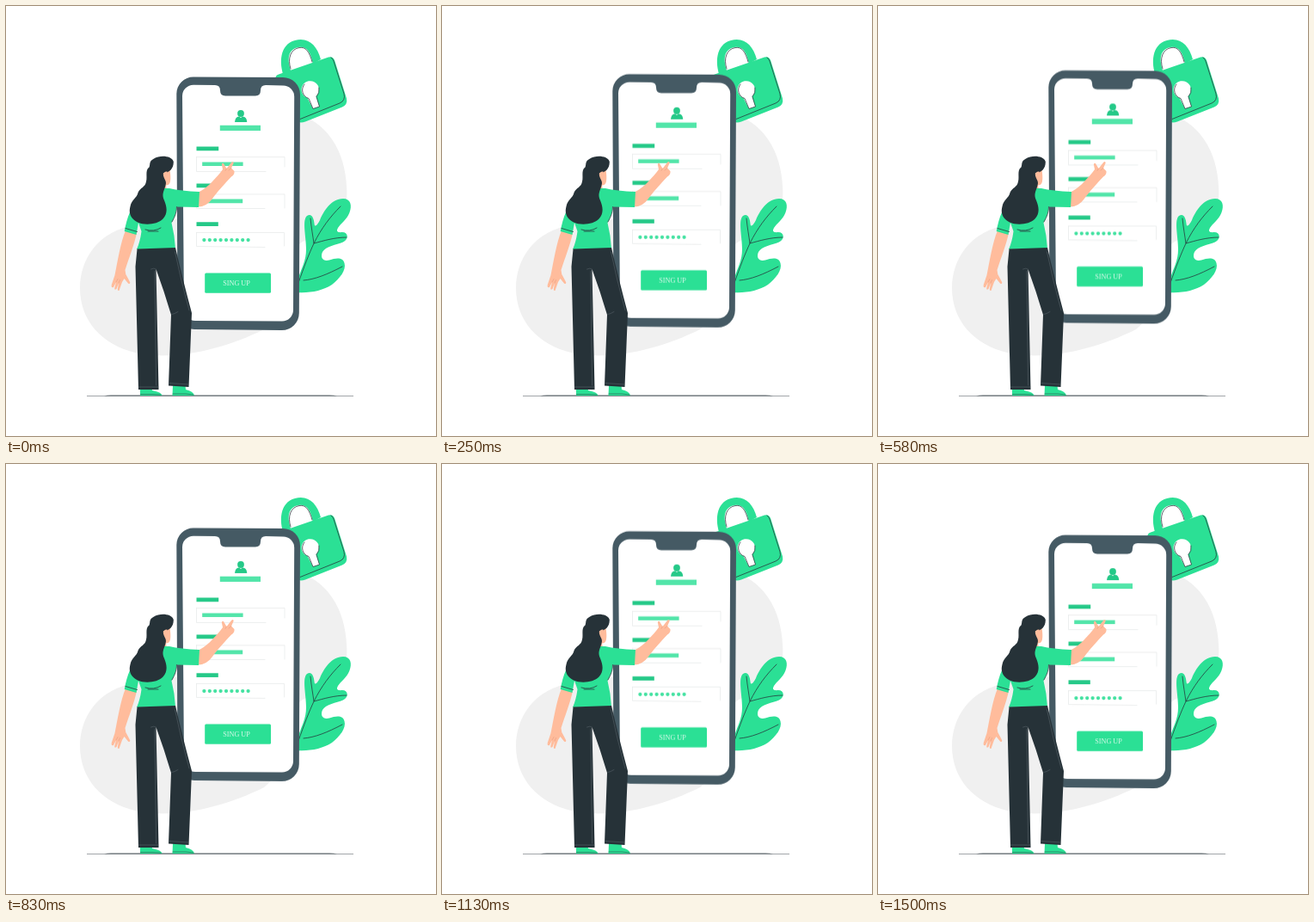
Recreate the animation shown at these times as an HTML page. Size 500 px wide and 500 px high, loop 1540 ms.

```html
<!DOCTYPE html>
<html lang="en">
<head>
<meta charset="utf-8">
<title>Sign up</title>
<style>
  html, body { margin: 0; width: 100%; height: 100%; overflow: hidden; background: #fff; }
  svg { display: block; width: 100vw; height: 100vh; }
  .green { fill: #2be095; }
  .deep { fill: #25c988; }
  .light { fill: #52e5a9; }
  .dark { fill: #263238; }
  .skin { fill: #ffbc9c; }
  .frame { fill: #455a64; }
  .blob { fill: #f0f0f0; }
  .white { fill: #fff; }
  .ink, .seam, .field, .crease { fill: none; stroke-linecap: round; stroke-linejoin: round; }
  .ink { stroke: #263238; stroke-width: .75; }
  .seam { stroke: #667178; stroke-width: .45; }
  .crease { stroke: #e0957b; stroke-width: .5; }
  .field { stroke: #e6e8e8; stroke-width: .7; }
  .dots { fill: none; stroke: #43e2a1; stroke-width: 4.3; stroke-linecap: round; stroke-dasharray: 0 6.4; }
  .label { font: 8.2px "Liberation Serif", "Times New Roman", serif; fill: #dcf9ec; text-anchor: middle; }
  #phone { animation: float 1.54s -8ms infinite; }
  /* linear rise and fall, sampled at 24 fps */
  @keyframes float {
    0% { transform: translateY(0); animation-timing-function: steps(18); }
    48.64% { transform: translateY(-9.8px); animation-timing-function: step-start; }
    48.65% { transform: translateY(-9.2px); animation-timing-function: steps(18); }
    97.29% { transform: translateY(.6px); animation-timing-function: step-start; }
    97.3%, 100% { transform: translateY(.1px); }
  }
</style>
</head>
<body>
<svg viewBox="0 0 500 500">
  <path class="blob" d="M150 255C108 261 86 294 86 328C86 366 112 394 150 403C194 413 252 400 300 376C335 350 318 300 342 276C360 264 385 262 392 240C396 228 397 220 396 210C394 170 376 139 342 126C290 118 280 180 245 220C220 248 190 250 150 255Z"/>

  <g id="lock">
    <path class="green" fill-rule="evenodd" d="M323 82C317.500 66 318 45 336 40C352 36 361.500 46 366 62L357 67C354 54 350 46 340 48C329 50 326 60 331 75Z"/>
    <path class="ink" d="M331 73C327 61 331 50 341 48.500C349 47 353 54 356 65"/>
    <path class="green" d="M317 79.500L375 59.500Q380 58 382 63L396 107.500Q397.500 114.500 391 117.500L348 134.500Q338 138 335 129L314 86Q312 81 317 79.500Z"/>
    <path class="ink" d="M378 60Q380 61 381 64L393 102Q395 110 388 113L342 131.500"/>
    <path class="white" d="M350.500 107A10.200 10.200 0 1 1 360.500 105L364.500 117L357 119.500Z"/>
    <path class="ink" d="M347 91A10.200 10.200 0 0 0 352 107.500L357 119.500L364.500 117L361 105.500Q365 101 364 95"/>
  </g>

  <g id="leaf">
    <path class="green" d="M338 333L340 316C344 304 349 296 349 283C349 268 344 249 350 244C356 240.500 358 248 358.500 253C359 259 363 253 365 249C369 239 378 224 392 224C401 224 402.500 232 399.500 240C396 249 389 253 386 258C383 263 387 263.500 391 263C398 263 399 271 392 274.500C384 278 372 279 368 286C365 293 369 297.500 376 295.500C384 292.500 392 292 393.500 299C396 307 388 317 379 324C368 331 354 334 338 333Z"/>
    <path class="ink" d="M340 322C347 302 352 289 358 276C367 258 377 245 389 233M354 247C355 258 357 268 358 276C369 273 382 269 396 269M346 319C359 318 374 312 391 303"/>
  </g>

  <g id="phone">
    <path class="frame" d="M218 82.500L322 83A20 20 0 0 1 342 103L340.800 357A20 20 0 0 1 320.800 377L219 376A19.500 19.500 0 0 1 199.500 356.500L198.300 102A19.500 19.500 0 0 1 218 82.500Z"/>
    <path class="white" d="M218 91.700L243 92Q249 92 249 98Q249 104.500 255 104.500H290Q296 104.500 296 98Q296 92 302 92L322 92.400A13 13 0 0 1 335.200 105.500L334 353.500A13 13 0 0 1 321 366.500L220 366A13 13 0 0 1 207 353L205 104.700A13 13 0 0 1 218 91.700Z"/>
    <g class="deep">
      <circle cx="273" cy="125" r="3.900"/>
      <path d="M266 135Q266.500 128.700 271 128.500L273 130L275 128.500Q280 128.700 280.300 135Z"/>
      <path d="M221.500 163.400h25.700v4.800h-25.700zM221.500 206.400h25.700v4.800h-25.700zM221.500 251.300h25.300v4.800h-25.300z"/>
    </g>
    <path class="light" d="M248.800 138.700H296V144.900H248.800ZM228.200 181.400H275.600V186H228.200ZM228.200 224.500H275.200V229.200H228.200Z"/>
    <path class="field" d="M221.500 175.600H324V187M221.500 175.600V192.500H302M221.500 218.900H324V235M221.500 218.900V235.500H301M221.500 263.500H323.500V279M221.500 263.500V279.500L301 280.500"/>
    <path class="dots" d="M230.400 272.100H282"/>
    <rect class="green" x="231.200" y="310.600" width="76.800" height="23.200" rx="1.500"/>
    <text class="label" x="268" y="325">SING UP</text>
  </g>

  <g id="floor">
    <path d="M94 453.500H404" stroke="#8b9094" stroke-width=".8"/>
    <path d="M114 453.500Q117 452.500 122 452.500H376Q382 452.500 385 453.500Z" fill="#596268"/>
  </g>

  <g id="woman">
    <path class="green" d="M156 445H169.500L170 447Q181 449 181.500 453H156ZM194 441H208.500L209 446Q218 448 219 453H193.500Z"/>
    <path class="ink" style="stroke-width:.5" d="M156.500 451.500H170L180 452M194 451H209L218 452"/>

    <path class="skin" d="M139 261L152 264C149 278 143 293 138.500 307Q138.500 312 141.500 316L144.300 321.500Q144 324 142 322.500L137.500 317L135 321L131.500 331Q129.500 331.500 129.800 329L131 322L128.500 329Q126 331 126.300 328L128 321L125 327Q122 328 122.800 324L126.500 313C130 296 133 276 139 261Z"/>
    <path class="crease" d="M128 321L130 317.500M131 322L132.500 318.500"/>

    <path class="skin" d="M222 217C232 214 242 202 249 194L252 190L250.800 184Q252.300 181.500 253.500 184L256.500 189L262 182Q264 180 264.700 182.500L262 188.500L265.500 192Q266 196 262 198.500C253 208 245 217 240 224Q233 234 222 233.500Z"/>
    <path class="crease" d="M256.500 189L255 191.500M262 188.500L259 191"/>

    <path class="skin" d="M181 194L190.500 190Q191.800 199 191 204Q190 208.500 186 208.500L187 214H179Z"/>
    <path class="green" d="M180 212L190 212Q203 215 225 216L224 234L198.500 233.500Q198 243 192.500 252Q196 266 197 282L152 283Q156 274 157.500 262L154 252L151.500 266L137.700 262Q140 249 144 240L155 222Z"/>
    <path class="ink" d="M139 258.500L152.500 262.500M198.500 233.500Q199 241 193 251M162 260Q172 263 180 258M165 262H177"/>

    <path class="dark" d="M194.800 181C193 174 179 173 172 177.500C166 180.500 168 184 166.500 187.500C161.500 191 164.500 198 163 204C162 211 156 211 153.500 217C152.500 223 146 225 144.500 233C142 242 146 248 153 251.500C162 255.500 176 254 182.500 247.500C188.500 241 187 233 184 226C180 218 185 214 186 206C186 202 182 199 183 194C190 194 195 189 194.800 181Z"/>
    <path class="skin" d="M187.500 192.500Q183.500 192 183 196Q184 200 187 199Z"/>

    <path class="dark" d="M152.500 282.500L197 281Q205 316 216 357L212.500 443L189 441.500L192 359Q184 332 174.500 306L177.500 446H154L150.500 303Z"/>
    <path class="seam" d="M168.500 306Q172 304 174.500 306M173 308L174.500 441M154.500 443H177M190 438.500L212 440M196.500 286Q203 318 213 354M193 358.500Q196 358 200 355.500"/>
  </g>
</svg>
</body>
</html>
```
